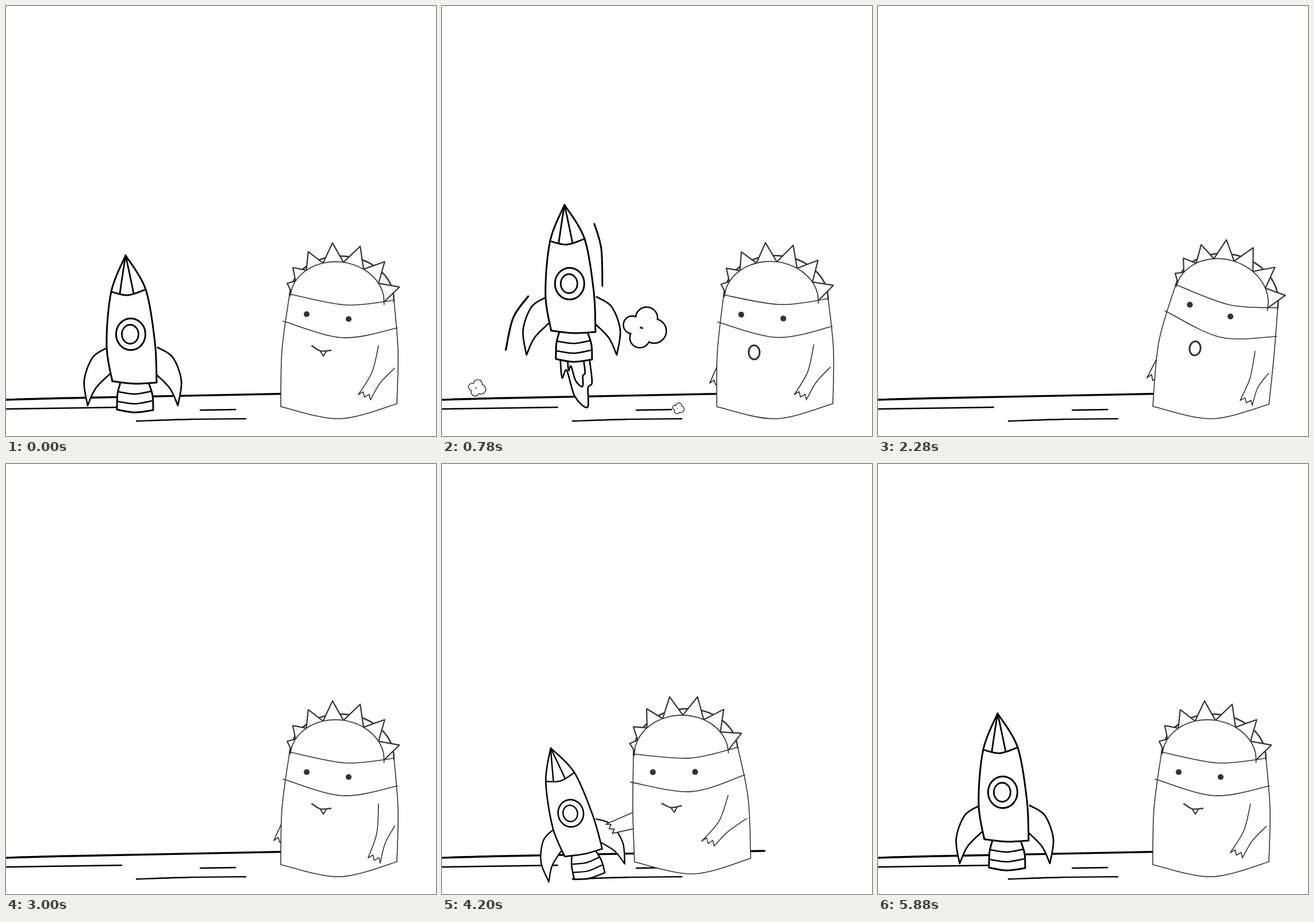
An HTML page with a canvas for the animation above (6600 ms loop, 748 px wide and 748 px high).

```html
<!DOCTYPE html>
<html lang="en">
<head>
<meta charset="utf-8">
<title>Rocket launch</title>
<style>
  html, body { margin: 0; width: 100%; height: 100%; overflow: hidden; background: #fff; }
  canvas { display: block; }
</style>
</head>
<body>
<canvas id="stage" width="748" height="748"></canvas>
<script>
const LOOP = 6600, STEP = 60;
const INK = '#333', BLACK = '#000';
const ctx = document.getElementById('stage').getContext('2d');
ctx.lineCap = ctx.lineJoin = 'round';

const mix = (a, b, p) => a + (b - a) * p;
const same = (x, y) => [x, y];

// Eased value at time t from pairs of time and value.
function track(t, ...keys) {
  if (t <= keys[0]) return keys[1];
  for (let i = 2; i < keys.length; i += 2) {
    if (t <= keys[i]) {
      const p = (t - keys[i - 2]) / (keys[i] - keys[i - 2]);
      return mix(keys[i - 1], keys[i + 1], p * p * (3 - 2 * p));
    }
  }
  return keys[keys.length - 1];
}

// Adds a flat point list to the path, either straight or as a smooth curve.
function trace(flat, map, smooth, join) {
  const pts = [];
  for (let i = 0; i < flat.length; i += 2) pts.push(map(flat[i], flat[i + 1]));
  if (join) ctx.lineTo(...pts[0]); else ctx.moveTo(...pts[0]);
  for (let i = 0; i < pts.length - 1; i++) {
    const b = pts[i], c = pts[i + 1];
    if (!smooth) { ctx.lineTo(...c); continue; }
    const a = pts[i - 1] || b, d = pts[i + 2] || c;
    ctx.bezierCurveTo(b[0] + (c[0] - a[0]) / 6, b[1] + (c[1] - a[1]) / 6,
                      c[0] - (d[0] - b[0]) / 6, c[1] - (d[1] - b[1]) / 6, ...c);
  }
}

// Curves joined end to end, with optional white fill.
function shape(curves, width, { map = same, color = BLACK, fill = false, smooth = true } = {}) {
  ctx.beginPath();
  curves.forEach((c, i) => trace(c, map, smooth, i > 0));
  ctx.fillStyle = '#fff';
  if (fill) ctx.fill();
  ctx.strokeStyle = color;
  ctx.lineWidth = width;
  ctx.stroke();
}

function oval(x, y, rx, ry, width, color = BLACK, tilt = 0) {
  ctx.beginPath();
  ctx.ellipse(x, y, rx, ry, tilt, 0, 2 * Math.PI);
  ctx.strokeStyle = ctx.fillStyle = color;
  ctx.lineWidth = width;
  if (width) ctx.stroke(); else ctx.fill();
}

// Point on the upper half of a tilted ellipse; a runs from 0 (left) to PI (right).
function arch(a, cx, cy, rx, ry, tilt) {
  const x = -rx * Math.cos(a), y = -ry * Math.sin(a);
  return [cx + x * Math.cos(tilt) - y * Math.sin(tilt), cy + x * Math.sin(tilt) + y * Math.cos(tilt)];
}

const archCurve = (...ellipse) =>
  Array.from({ length: 13 }, (_, i) => arch(i * Math.PI / 12, ...ellipse)).flat();

// Zigzag of three claws from a to b.
function claws(ax, ay, bx, by) {
  const dx = bx - ax, dy = by - ay;
  return Array.from({ length: 5 }, (_, i) => {
    const depth = i % 2 * .34;
    return [ax + dx * i / 4 + dy * depth, ay + dy * i / 4 - dx * depth];
  }).flat();
}

function drawGround() {
  shape([[0, 685, 110, 682, 561, 673]], 3.3);
  shape([[0, 701, 201, 698]], 2.4);
  shape([[227, 722, 320, 719, 417, 718]], 2.4);
  shape([[338, 703, 399, 702]], 2.4);
}

// A cloud of four round lobes that swells and shrinks on its way.
function drawPuff(t, start, life, x0, y0, x1, y1, size) {
  const p = (t - start) / life;
  if (p <= 0 || p >= 1) return;
  const s = size * Math.sin(Math.PI * p), x = mix(x0, x1, p), y = mix(y0, y1, p);
  for (const outline of [Math.max(2.4, 5 * s), 0]) {
    for (let a = .3; a < 6; a += Math.PI / 2) {
      const r = (17 + 3 * Math.cos(a)) * s;
      oval(x + 20 * s * Math.cos(a), y + 18 * s * Math.sin(a), r, r, 2 * outline / 2, outline ? BLACK : '#fff');
    }
  }
}

function drawFlame(grow) {
  const flame = [201, 706, 204, 735, 212, 722, 226, 767, 248, 786, 249, 752, 256, 743, 252, 706];
  for (const size of [1, .55]) {
    const map = (x, y) => [mix(229, x, size), 706 + (y - 706) * size * grow];
    shape([flame], 2.7, { map, fill: true });
  }
}

function drawRocket() {
  for (const side of [1, -1]) {
    const map = (x, y) => [220.5 + side * (x - 220.5), y];
    shape([[177, 594, 151, 611, 136, 652, 142, 695], [142, 695, 156, 665, 183, 638]], 2.7, { map, fill: true });
  }
  shape([[199, 655, 194, 675, 193, 702], [193, 702, 224, 707, 256, 703],
         [256, 703, 255, 678, 248, 655]], 3, { fill: true });
  for (const y of [671, 688]) shape([[195, y, 224, y + 4, 253, y - 1]], 2.6);
  shape([[185, 653, 175, 590, 183, 497, 208, 434], [208, 434, 243, 493, 259, 585, 262, 655],
         [262, 655, 225, 657, 187, 653]], 3, { fill: true });
  shape([[183, 497, 212, 503, 243, 493]], 2.8);
  for (const side of [-1, 1]) shape([[208, 434, 209 + 6 * side, 466, 210 + 12 * side, 500]], 2.8);
  oval(217, 571, 25.5, 27.5, 3);
  oval(216, 571, 14.5, 16.5, 2.8);
}

function drawLaunch(t) {
  if (t >= 1260) return;
  const rise = t < STEP ? 0 : 88 * Math.pow(4 / 3, (t - 780) / STEP);
  drawPuff(t, 120, 780, 225, 690, 30, 660, .86);
  drawPuff(t, 120, 720, 240, 700, 426, 700, 1);
  drawPuff(t, 480, 600, 260, 680, 440, 440, 1);
  ctx.save();
  ctx.translate(Math.min(5, rise / 17), -rise);
  if (t >= STEP) drawFlame(track(t, 0, .2, 300, 1));
  drawRocket();
  if (t >= 360) {
    shape([[260, 467, 272, 510, 274, 575]], 3);
    shape([[145, 593, 119, 630, 106, 686]], 3.2);
  }
  ctx.restore();
}

function drawCarried(t) {
  if (t < 3540) return;
  const size = track(t, 3480, .8, 4200, .865, 4860, .99, 4920, .99, 5280, 1);
  const tilt = track(t, 4200, -13.4, 4860, -4.1, 4920, -4.1, 5280, 0);
  ctx.save();
  ctx.translate(track(t, 3480, 590, 4200, 257, 4860, 222.5, 4920, 222.5, 5280, 224.5),
                track(t, 3480, 690, 4200, 718, 4860, 698, 4920, 698, 5280, 704));
  ctx.rotate(tilt * Math.PI / 180);
  ctx.scale(size, size);
  ctx.translate(-224.5, -704);
  drawRocket();
  ctx.restore();
}

function drawMonster(t) {
  const move = track(t, 3480, 0, 4200, 1, 5460, 1, 5880, 0);
  const bend = track(t, 60, 0, 780, -.023, 1260, .194, 2220, .194, 2460, 0,
                     3480, 0, 4200, -.125, 4860, -.117, 5460, -.117, 5880, 0);
  const look = Math.max(0, bend / .194);
  const stretch = .012 * Math.min(1, Math.abs(bend) / .1);

  // The foot stays flat, the lower body curves and the rest is straight.
  const map = (x, y) => {
    const h = Math.max(0, 700 - y), u = x - 580, ramp = 110;
    const angle = bend * Math.min(1, h / ramp);
    const shift = bend * (h < ramp ? h * h / ramp / 2 : h - ramp / 2);
    return [580 + shift + u * Math.cos(angle) - 143 * move,
            y - stretch * h + u * Math.sin(angle) - 5 * move];
  };
  const draw = (curves, width, options) => shape(curves, width, { map, color: INK, ...options });

  // Far arm
  const farX = track(t, 300, 511, 660, 466, 3480, 466, 4200, 431, 4800, 511);
  const farY = track(t, 3480, 655, 4200, 619, 4800, 655);
  const turn = track(t, 3480, .32, 4200, 1.1, 4800, .32);
  const paw = claws(farX, farY, farX + 22 * Math.cos(turn), farY + 22 * Math.sin(turn));
  draw([[492, 597], paw, [495, 630]], 1.8, { fill: true, smooth: false });

  // Body and spiky head
  const crown = archCurve(584, 508, 91, 73, .06);
  draw([[478, 697, 480, 600, 493, 503], crown, [675, 513, 682, 600, 680, 692],
        [680, 692, 580, 718, 478, 697]], 1.6, { fill: true });
  draw([crown], 2.5);

  const dome = [576, 512, 82, 67, .09];
  for (let i = 0; i < 7; i++) {
    const [a, b] = [i, i + 1].map(k => arch(.13 + 2.94 * (k / 7) ** 1.2, ...dome));
    const height = Math.min(.97, .6 + .15 * i);
    const tip = [(a[0] + b[0]) / 2 + (b[1] - a[1]) * height, (a[1] + b[1]) / 2 - (b[0] - a[0]) * height];
    draw([[...a, ...tip, ...b]], 2.2, { fill: true, smooth: false });
  }
  draw([archCurve(...dome)], 1.7, { fill: true });
  draw([[493, 501, 590, 520, 674, 512]], 1.6);
  draw([[482, 548, 585, 577, 681, 560]], 1.6);

  // Face
  const blink = t >= 2940 && t < 3000;
  for (const [x, y] of [[523, 536], [596, 544.5]]) {
    const [ex, ey] = map(x, y);
    if (blink) draw([[x - 5, y, x + 5, y]], 2);
    else oval(ex + look, ey - 6 * look, 5.1, 5.1, 0, INK);
  }
  if (t >= 300 && t < 2340) {
    oval(...map(544, 602), 9.5, 12.3, 3, INK, bend);
  } else {
    draw([[532, 591, 547, 600, 565, 599]], 2.3);
    draw([[547, 601, 552, 609, 557, 601]], 2, { smooth: false });
  }

  // Near arm
  const x = track(t, 780, 613, 1260, 630, 3480, 630, 4200, 596, 5460, 596, 5880, 613);
  const y = track(t, 780, 676, 1260, 685, 3480, 685, 4200, 662, 5460, 662, 5880, 676);
  draw([[648, 591, (648 + x) / 2 + 6, (591 + y) / 2 + 4, x, y]], 1.6);
  draw([claws(x, y, x + 21, y + 9)], 1.6, { smooth: false });
  draw([[x + 21, y + 9, (x + 697) / 2 - 4, (y + 639) / 2 - 2, 676, 630]], 1.6);
}

let begin;
function frame(now) {
  begin ??= now;
  const t = Math.floor((now - begin) % LOOP / STEP) * STEP;
  ctx.fillStyle = '#fff';
  ctx.fillRect(0, 0, 748, 748);
  drawGround();
  drawLaunch(t);
  drawCarried(t);
  drawMonster(t);
  requestAnimationFrame(frame);
}
requestAnimationFrame(frame);
</script>
</body>
</html>
```
